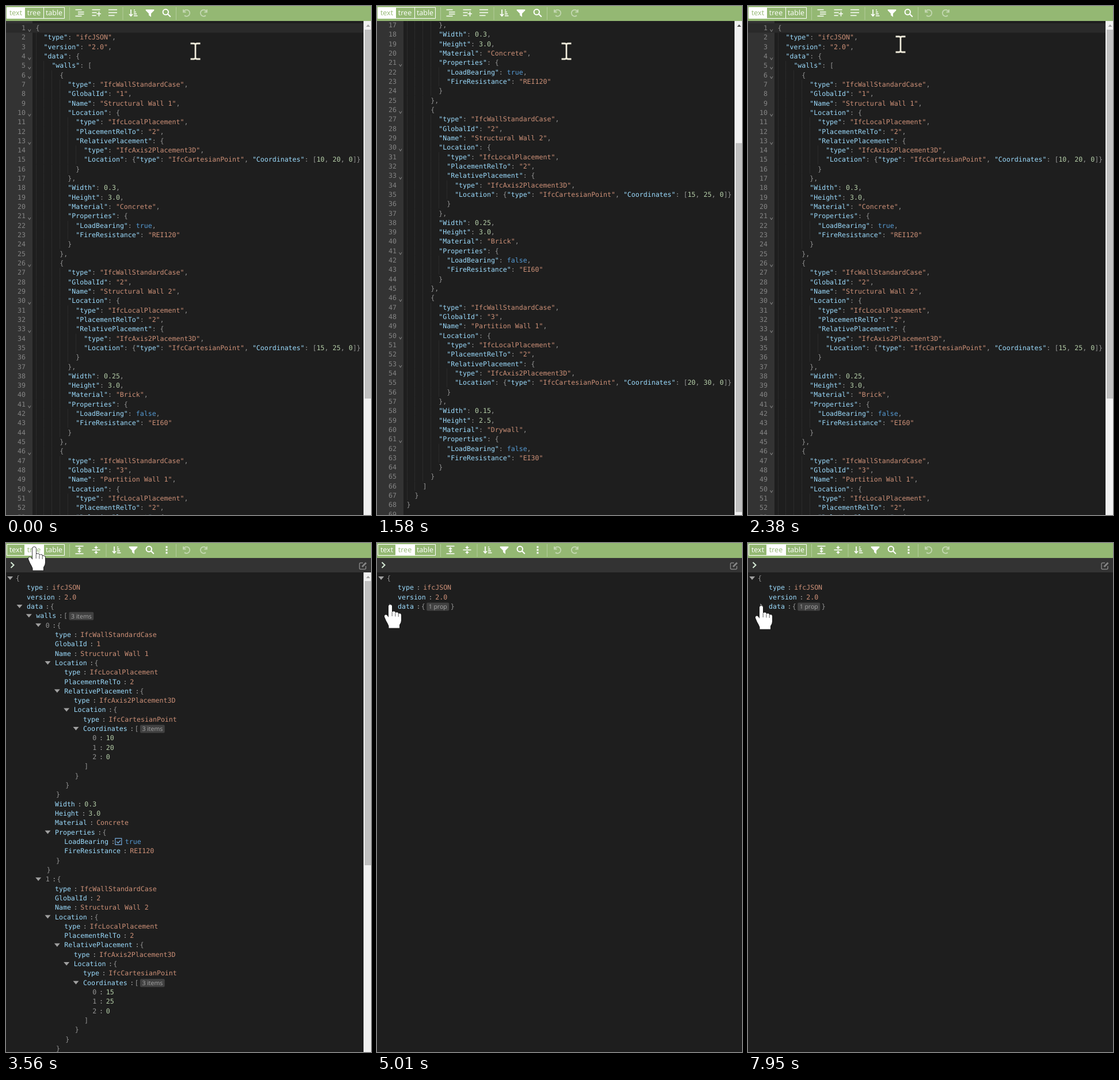
These frames come from a looping animation (634x883 px, 8000 ms). An HTML page with a canvas:

```html
<!DOCTYPE html>
<html lang="en">
<head>
<meta charset="utf-8">
<title>JSON editor</title>
<style>
html, body { margin: 0; width: 100%; height: 100%; overflow: hidden; background: #1e1e1e; }
canvas { display: block; }
</style>
</head>
<body>
<canvas id="stage" width="634" height="883"></canvas>
<script>
const W = 634, H = 883, LOOP = 8000;
const ROW = 16.32, CH = 6.97;
const MONO = '11.58px "DejaVu Sans Mono", "Noto Sans Mono", monospace';
const SANS = '"Open Sans", "Noto Sans", sans-serif';
const GREEN = '#94b873', BG = '#1e1e1e', PANEL = '#333333', GRAY = '#949494';
const COLORS = { key: '#9cdcfe', str: '#ce9178', num: '#b5cea8', bool: '#569cd6' };
const ctx = document.getElementById('stage').getContext('2d');

// ---- document: objects are lists of [key, value], numbers keep their spelling
const num = raw => ({ kind: 'num', raw });
const str = raw => ({ kind: 'str', raw });
const bool = raw => ({ kind: 'bool', raw });
const obj = (...items) => ({ kind: 'obj', items });
const arr = (items, inline) => ({ kind: 'arr', items: items.map((v, i) => [String(i), v]), inline });

function wall(id, name, coords, width, height, material, bearing, fire) {
  const point = obj(['type', str('IfcCartesianPoint')],
    ['Coordinates', arr(coords.map(num), true)]);
  point.inline = true;
  return obj(
    ['type', str('IfcWallStandardCase')],
    ['GlobalId', str(id)],
    ['Name', str(name)],
    ['Location', obj(
      ['type', str('IfcLocalPlacement')],
      ['PlacementRelTo', str('2')],
      ['RelativePlacement', obj(['type', str('IfcAxis2Placement3D')], ['Location', point])])],
    ['Width', num(width)],
    ['Height', num(height)],
    ['Material', str(material)],
    ['Properties', obj(['LoadBearing', bool(bearing)], ['FireResistance', str(fire)])]);
}

const doc = obj(
  ['type', str('ifcJSON')],
  ['version', str('2.0')],
  ['data', obj(['walls', arr([
    wall('1', 'Structural Wall 1', ['10', '20', '0'], '0.3', '3.0', 'Concrete', 'true', 'REI120'),
    wall('2', 'Structural Wall 2', ['15', '25', '0'], '0.25', '3.0', 'Brick', 'false', 'EI60'),
    wall('3', 'Partition Wall 1', ['20', '30', '0'], '0.15', '2.5', 'Drywall', 'false', 'EI30')
  ])])]);

const isBox = v => v.kind === 'obj' || v.kind === 'arr';
const brackets = v => v.kind === 'obj' ? '{}' : '[]';

// ---- text view: lines of [text, colour] tokens
function textLines(root) {
  const lines = [];
  let line;
  const start = indent => lines.push(line = { indent, tokens: [] });
  const put = (text, color = GRAY) => line.tokens.push([text, color]);
  function write(v, depth) {
    if (!isBox(v)) return put(v.kind === 'str' ? `"${v.raw}"` : v.raw, COLORS[v.kind]);
    const [open, close] = brackets(v);
    put(open);
    if (!v.inline) line.fold = true;
    v.items.forEach(([key, child], i) => {
      if (!v.inline) start(depth + 1);
      if (v.kind === 'obj') { put(`"${key}"`, COLORS.key); put(': '); }
      write(child, depth + 1);
      if (i < v.items.length - 1) put(v.inline ? ', ' : ',');
    });
    if (!v.inline) start(depth);
    put(close);
  }
  start(0);
  write(root, 0);
  start(0);
  return lines;
}

// ---- tree view: flat rows
function treeRows(root, collapsedKey) {
  const rows = [];
  (function walk(key, v, depth, inArray) {
    const collapsed = isBox(v) && key === collapsedKey;
    rows.push({ key, v, depth, inArray, collapsed });
    if (!isBox(v) || collapsed) return;
    for (const [k, child] of v.items) walk(k, child, depth + 1, v.kind === 'arr');
    rows.push({ close: brackets(v)[1], depth });
  })('', root, 0, false);
  return rows;
}

const lines = textLines(doc);
const fullTree = treeRows(doc);
const dataClosed = treeRows(doc, 'data').slice(0, 4);
const rootClosed = treeRows(doc, '');

// ---- timeline
const scrollKeys = [[0, 0], [660, 60], [790, 166], [920, 240], [1050, 270],
  [1580, 266], [1710, 160], [1840, 50], [1970, 0]];
const pointerKeys = [[0, 329, 78], [2380, 265, 66], [2510, 185, 48], [2640, 105, 19],
  [2770, 58, 11], [2900, 49, 7], [4100, 50, 18], [4230, 50, 46], [4350, 50, 69],
  [4490, 42, 85], [4620, 30, 102], [4750, 23, 107], [5800, 23, 108], [5930, 23, 109],
  [6070, 14, 86], [6200, 6, 59], [6350, 6, 63], [6480, 6, 65], [7150, 6, 63], [7280, 7, 60],
  [7560, 9, 66], [7690, 18, 84], [7820, 26, 101], [7950, 23, 109]];
const at = (keys, t) => keys.findLast(k => k[0] <= t);

// ---- drawing helpers
function rect(x, y, w, h, color) {
  ctx.fillStyle = color;
  ctx.fillRect(x, y, w, h);
}
function text(s, x, y, color, font = MONO, align = 'left') {
  ctx.font = font;
  ctx.textAlign = align;
  ctx.fillStyle = color;
  ctx.fillText(s, x, Math.round(y));
}
function stroke(d, color, width = 1) {
  ctx.strokeStyle = color;
  ctx.lineWidth = width;
  ctx.stroke(new Path2D(d));
}
function fill(d, color) {
  ctx.fillStyle = color;
  ctx.fill(new Path2D(d));
}
function moved(x, y, draw) {
  ctx.save();
  ctx.translate(x, y);
  draw();
  ctx.restore();
}

function scrollbar(top, thumb, length, arrow) {
  rect(621, top, 13, H - top, '#f1f1f1');
  rect(623, thumb, 11, length, '#c1c1c1');
  fill(`M625.5 ${top + 10}l3.5 -4l3.5 4z`, arrow);
}

// ---- toolbar icons, centred on 0,0
const icons = {
  format: () => stroke('M-7 -5.5H4M-2.5 -1.5H8M-2.5 2H8M-7 5.5H4', '#fff', 1.5),
  compact: () => {
    stroke('M-7 -5.5H7M-7 -.5H1M-7 4.5H0', '#fff', 1.5);
    stroke('M5 -2.5V6M1 1.5H8.5', '#fff', 1.5);
  },
  align: () => stroke('M-7.5 -5.5H7.5M-7.5 -.5H7.5M-7.5 4.5H3', '#fff', 1.6),
  expand: () => {
    stroke('M-7 -6.5H7M-7 6.5H7M0 -3V3', '#fff', 1.7);
    fill('M-3.5 -1.5L0 -5L3.5 -1.5zM-3.5 1.5L0 5L3.5 1.5z', '#fff');
  },
  collapse: () => {
    stroke('M-7 0H7M0 -7V-4M0 4V7', '#fff', 1.7);
    fill('M-3.5 -5L0 -1.5L3.5 -5zM-3.5 5L0 1.5L3.5 5z', '#fff');
  },
  sort: () => {
    stroke('M-4 -6V5M-7 2L-4 5.5L-1 2', '#fff', 1.7);
    stroke('M1 -5H3M1 -1.7H4.5M1 1.7H6M1 5H7.5', '#fff', 1.7);
  },
  filter: () => fill('M-7 -6H7Q8 -5 7 -4L2 1V7L-2 4V1L-7 -4Q-8 -5 -7 -6z', '#fff'),
  search: () => stroke('M3 -1.5A4.7 4.7 0 1 1 -6.4 -1.5A4.7 4.7 0 1 1 3 -1.5M2 2L6.8 6.8', '#fff', 2),
  dots: () => [-5, 0, 5].forEach(y => rect(-1.5, y - 1.5, 3, 3, '#fff')),
  undo: () => {
    ctx.globalAlpha = .45;
    stroke('M-6 -6V-1.5H-1.5M-5.5 -2A5.6 5.6 0 1 1 -4 4.5', '#fff', 1.8);
  },
  redo: () => {
    ctx.scale(-1, 1);
    icons.undo();
  }
};

function toolbar(tree, hover) {
  rect(0, 0, W, 26, GREEN);
  if (tree) rect(32, 3, 33, 18, '#fff');
  else rect(1, 3, 31, 18, '#fff');
  if (hover) rect(32, 3, 33, 18, 'rgba(255,255,255,.2)');
  stroke('M1.5 2.5H101.5V21.5H1.5zM32.5 3V21M65.5 3V21', '#fff');
  [['text', 17, !tree], ['tree', 48.5, tree], ['table', 83.5, false]].forEach(([s, x, on]) =>
    text(s, x, 16, on ? GREEN : '#fff', '12.5px ' + SANS, 'center'));
  const names = tree ? 'expand collapse | sort filter search dots' : 'format compact align | sort filter search';
  const separators = [110.5, 295.5];
  let x = 127.5;
  for (const name of names.split(' ')) {
    if (name === '|') {
      separators.push(x - 11.5);
      x += 6.5;
    } else {
      moved(x, 12, icons[name]);
      x += 29;
    }
  }
  moved(314, 12, icons.undo);
  moved(343, 12, icons.redo);
  separators.forEach(s => rect(s - .5, 2, 1, 22, 'rgba(255,255,255,.3)'));
}

function textView(scroll) {
  rect(0, 26, 46, H, PANEL);
  rect(0, 30 - scroll, 621, ROW, '#2a2a2a');
  lines.forEach((line, i) => {
    const y = 38 + i * ROW - scroll;
    if (y < 10 || y > H + 12) return;
    text(i + 1, 34, y + 4, '#858585', MONO, 'right');
    if (line.fold) stroke(`M38.5 ${y + 2.5}l2.2 4l2.2 -4`, '#8a8a8a');
    for (let k = 0; k < line.indent; k++)
      rect(Math.round(51.5 + k * 2 * CH), y - ROW / 2, 1, ROW, '#2b2b2b');
    let x = 51.5 + line.indent * 2 * CH;
    for (const [s, color] of line.tokens) {
      text(s, x, y + 4, color);
      x += s.length * CH;
    }
  });
  scrollbar(26, 41 + scroll * .74, 640, scroll ? '#505050' : '#a3a3a3');
}

// small count badge; returns its right edge
function badge(v, x, y) {
  const n = v.items.length;
  const s = `${n} ${v.kind === 'arr' ? 'item' : 'prop'}${n > 1 ? 's' : ''}`;
  ctx.font = '10.5px ' + SANS;
  const w = ctx.measureText(s).width + 7;
  ctx.fillStyle = '#414141';
  ctx.beginPath();
  ctx.roundRect(x, y - 6.5, w, 14, 2);
  ctx.fill();
  text(s, x + 3.5, y + 4.3, '#a8a8a8', '10.5px ' + SANS);
  return x + w;
}

function treeRow(row, y) {
  const keyX = 36 + (row.depth - 1) * 16.33, base = y + 4;
  if (row.close) return text(row.close, keyX + 2, base, GRAY);
  const { key, v } = row;
  let x = keyX - 2.5;
  if (row.depth) {
    text(key, keyX, base, row.inArray ? GRAY : COLORS.key);
    x = keyX + key.length * CH;
    text(':', x + 4.6, base, '#a8a8a8');
    x += 12.8;
  }
  if (isBox(v)) {
    const ax = keyX - 12.5;
    fill(row.collapsed ? `M${ax - 2} ${y - 5}l5 5l-5 5z` : `M${ax - 5} ${y - 3}h10l-5 6z`, '#a0a0a0');
    const [open, close] = brackets(v);
    if (!row.depth) x = 17;
    text(open, x, base, GRAY);
    if (row.collapsed || v.kind === 'arr') x = badge(v, x + 9.5, y);
    if (row.collapsed) text(close, x + 2.5, base, GRAY);
  } else if (v.kind === 'bool') {
    stroke(`M${x - 1} ${y - 5.5}h11v11h-11z`, '#75a8d8', 1.2);
    stroke(`M${x + 1.5} ${y}l2.5 2.5l4 -4.5`, '#75a8d8', 1.3);
    text(v.raw, x + 16, base, COLORS.bool);
  } else {
    text(v.raw, x + 3.6, base, COLORS[v.kind]);
  }
}

function treeView(rows) {
  rect(0, 26, W, 25, PANEL);
  stroke('M8.5 33.5L13.5 38.2L8.5 43', '#d5ead5', 2);
  stroke('M620 34.5H616Q614 34.5 614 36.5V43.5Q614 45.5 616 45.5H623Q625 45.5 625 43.5V40', '#858585', 1.5);
  stroke('M618.5 41.2L625.5 34.2', '#858585', 3);
  rows.forEach((row, i) => {
    if (i <= 51) treeRow(row, 61 + i * ROW);
  });
  if (rows === fullTree) scrollbar(51, 66, 493, '#a3a3a3');
}

// ---- pointers
function beam() {
  const d = 'M-8.5 -13H-3Q0 -13 0 -10.5Q0 -13 3 -13H8.5M0 -11V12M-8.5 14H-3Q0 14 0 11.5Q0 14 3 14H8.5';
  stroke(d, '#111', 4.2);
  stroke(d, '#f0ecdc', 2.8);
}
function hand() {
  const d = 'M-3 3Q-3 0 0 0Q3 0 3 3V13Q4 11.5 6 11.5Q9 11.5 9 14.5Q10 13 12 13.2' +
    'Q14 13.5 14.3 16Q15 15 16.5 15.2Q19 15.5 19 18.5V27Q19 31 16 35V40.5H-2.5V37' +
    'Q-4 33 -7 28L-10 21Q-10.5 17.5 -7.5 17.5Q-6 17.5 -5 19L-3 22z';
  stroke(d, '#1a1a1a', 1.6);
  fill(d, '#fff');
  stroke('M3.2 13V20M8.9 14.5V20.5M14.2 16V21', '#444', .9);
}

function draw(t) {
  const tree = t >= 3300;
  rect(0, 0, W, H, BG);
  if (!tree) textView(at(scrollKeys, t)[1]);
  else if (t < 5010) treeView(fullTree);
  else treeView(t >= 6620 && t < 7150 ? rootClosed : dataClosed);
  toolbar(tree, t >= 2770 && !tree);
  const [, x, y] = at(pointerKeys, t);
  moved(x, y, t < 2640 ? beam : hand);
}

ctx.textRendering = 'geometricPrecision';
const begin = performance.now();
(function frame() {
  draw((performance.now() - begin) % LOOP);
  requestAnimationFrame(frame);
})();
</script>
</body>
</html>
```
